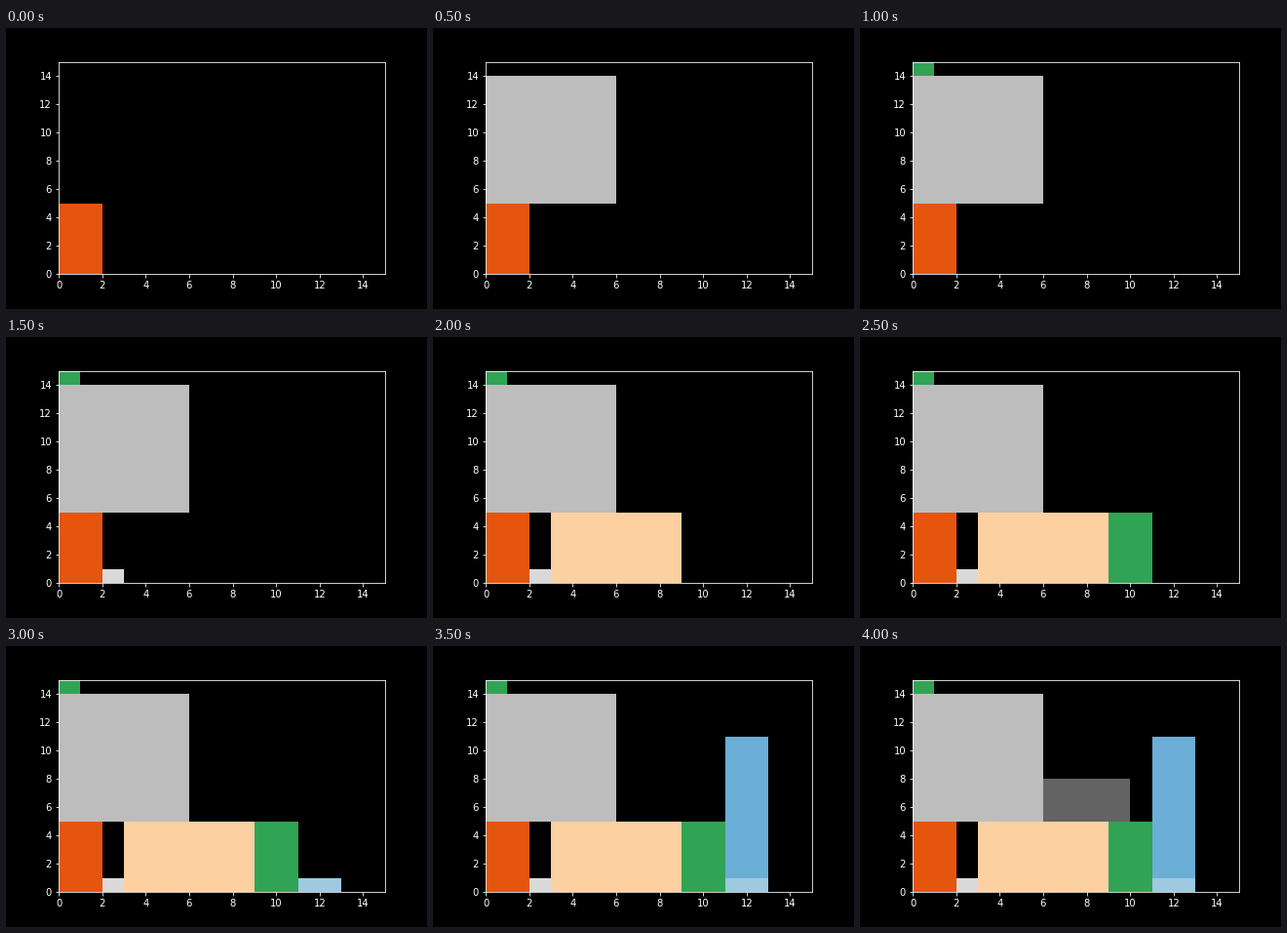
A matplotlib script that plays this animation: 432x288 px, repeating every 4500 ms.

```python
import matplotlib.pyplot as plt
from matplotlib.animation import FuncAnimation
from matplotlib.patches import Rectangle

plt.style.use("dark_background")

SIZE = 15
STEP_MS = 500

# x, y, width, height, colour, in order of placement
BLOCKS = [
    (0, 0, 2, 5, "#e6550d"),
    (0, 5, 6, 9, "#bdbdbd"),
    (0, 14, 1, 1, "#31a354"),
    (2, 0, 1, 1, "#d9d9d9"),
    (3, 0, 6, 5, "#fdd0a2"),
    (9, 0, 2, 5, "#31a354"),
    (11, 0, 2, 1, "#9ecae1"),
    (11, 1, 2, 10, "#6baed6"),
    (6, 5, 4, 3, "#636363"),
]

fig, ax = plt.subplots(figsize=(6, 4), dpi=72)
fig.subplots_adjust(left=0.125, right=0.9, bottom=0.125, top=0.88)
ax.set_xlim(0, SIZE)
ax.set_ylim(0, SIZE)
ax.set_xticks(range(0, SIZE, 2))
ax.set_yticks(range(0, SIZE, 2))

patches = [
    ax.add_patch(Rectangle((x, y), w, h, facecolor=color, linewidth=0))
    for x, y, w, h, color in BLOCKS
]


def update(frame):
    for i, patch in enumerate(patches):
        patch.set_visible(i <= frame)
    return patches


anim = FuncAnimation(fig, update, frames=len(BLOCKS), interval=STEP_MS,
                     repeat=True, repeat_delay=0)
plt.show()
```
